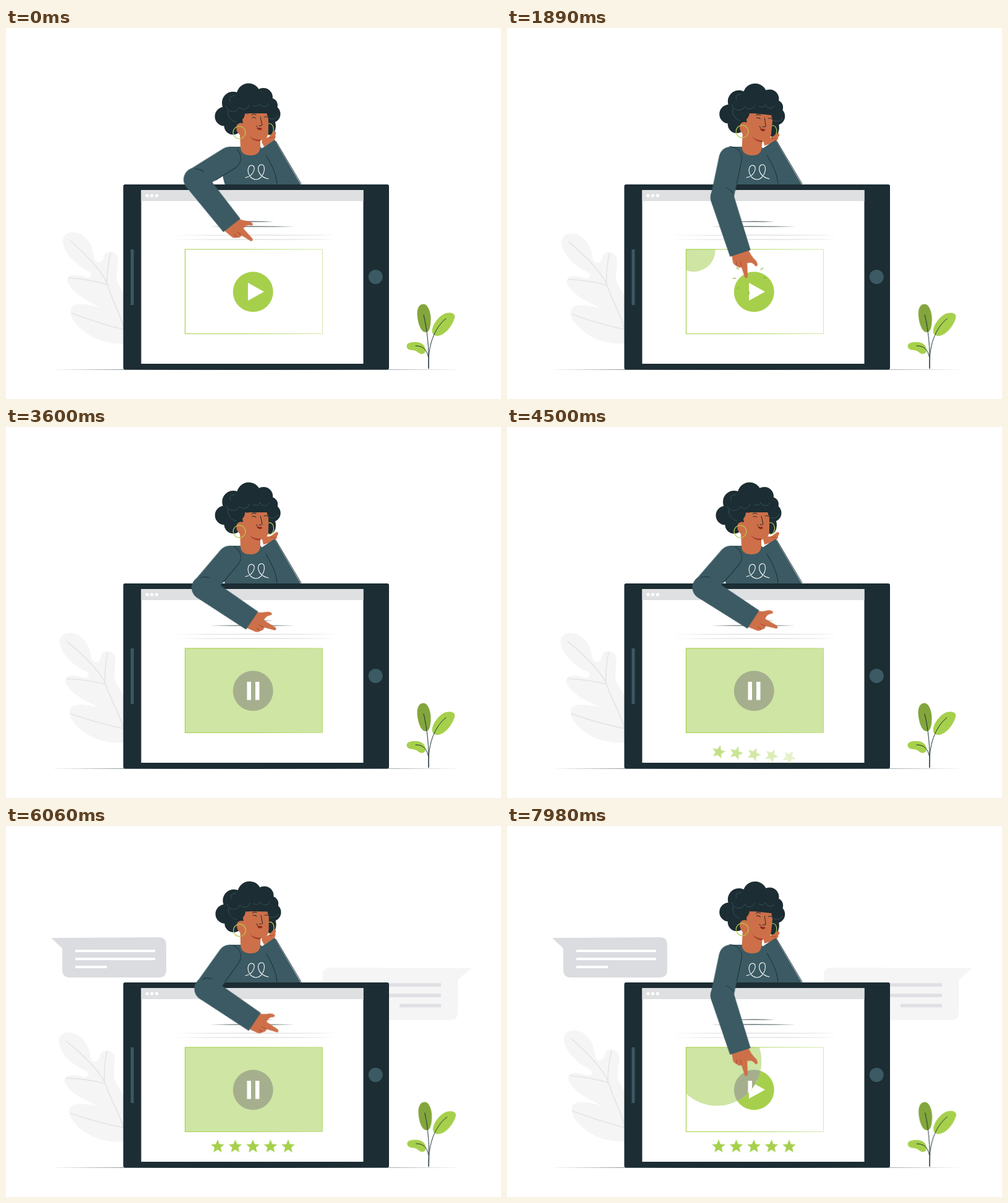
An HTML page without scripts for the animation above (8 s loop, 800 by 600 pixels).

```html
<!DOCTYPE html>
<html lang="en">
<head>
<meta charset="utf-8">
<title>Video lesson</title>
<style>
  html, body { margin: 0; width: 100%; height: 100%; overflow: hidden; background: #fff; }
  svg { display: block; width: 100vw; height: 100vh; }

  .upper, .fore, .hand, .head, .chin-hand, .big-leaf, .plant,
  .reveal, .burst, .star, .bubble { animation: 8s ease-in-out infinite both; }

  /* shoulder, elbow, wrist */
  .upper { animation-name: upper; }
  .fore { animation-name: fore; }
  .hand { animation-name: hand; }
  @keyframes upper {
    0% { rotate: 148deg; }
    13%, 33.75% { rotate: 101.8deg; animation-timing-function: ease-in; }
    37.5% { rotate: 112.6deg; animation-timing-function: ease-out; }
    46.25%, 71.25% { rotate: 130.9deg; animation-timing-function: ease-in; }
    75.75% { rotate: 125.5deg; animation-timing-function: ease-out; }
    85%, 100% { rotate: 101.8deg; }
  }
  @keyframes fore {
    0% { rotate: -96.5deg; }
    13%, 33.75% { rotate: -29.8deg; animation-timing-function: ease-in; }
    37.5% { rotate: -49.6deg; animation-timing-function: ease-out; }
    46.25%, 71.25% { rotate: -97.9deg; animation-timing-function: ease-in; }
    75.75% { rotate: -91.5deg; animation-timing-function: ease-out; }
    85%, 100% { rotate: -29.8deg; }
  }
  @keyframes hand {
    0% { rotate: -15.5deg; }
    13%, 33.75% { rotate: 3.6deg; }
    37.5% { rotate: 1deg; animation-timing-function: ease-out; }
    46.25%, 71.25% { rotate: -15deg; animation-timing-function: ease-in; }
    75.75% { rotate: -12.5deg; animation-timing-function: ease-out; }
    85%, 100% { rotate: 3.6deg; }
  }

  .head { transform-origin: 395px 200px; animation-name: head; }
  @keyframes head {
    0% { rotate: 0deg; }
    12%, 33.75% { rotate: 5.6deg; animation-timing-function: ease-in; }
    37.5% { rotate: 5.1deg; }
    46.25%, 71.25% { rotate: 0deg; animation-timing-function: ease-in; }
    75.75% { rotate: 1deg; animation-timing-function: ease-out; }
    85%, 100% { rotate: 5.6deg; }
  }
  .chin-hand { transform-origin: 424px 187px; animation-name: chin; }
  @keyframes chin {
    0%, 75.75% { rotate: 0deg; }
    12%, 37.5% { rotate: 14deg; }
    46.25%, 62% { rotate: 13deg; }
    85%, 100% { rotate: 15deg; }
  }

  .big-leaf { transform-origin: 192px 510px; animation-name: leaf; }
  @keyframes leaf {
    0%, 33%, 99.75%, 100% { rotate: 0deg; }
    17%, 50% { rotate: -2.4deg; }
    23.6% { rotate: -1.4deg; }
    37.5% { rotate: -.7deg; }
    56.25% { rotate: -1.9deg; }
    65% { rotate: -1.3deg; }
    75.75%, 87.75% { rotate: -2.4deg; }
  }
  .plant { transform-origin: 683px 552px; animation-name: sway; }
  @keyframes sway {
    0%, 11.25%, 22.5%, 33.75%, 45%, 56.25%, 67.5%, 78.75%, 90% { rotate: 0deg; }
    5.625%, 16.875%, 28.125%, 39.375%, 50.625%, 61.875%, 73.125%, 84.375%, 95.625% { rotate: 2.2deg; }
    100% { rotate: .4deg; }
  }

  .reveal { animation-name: reveal; }
  @keyframes reveal {
    0%, 20.6% { transform: translate(267px, 340px) scale(0); }
    29.4%, 95.4% { transform: translate(407px, 418px) scale(1); animation-timing-function: ease-in; }
    100% { transform: translate(333px, 377px) scale(.47); }
  }
  .burst { animation-name: burst; }
  @keyframes burst {
    0%, 20.6% { transform: scale(.3); opacity: 0; }
    21.3% { transform: scale(.6); opacity: 1; animation-timing-function: ease-out; }
    24% { transform: scale(1.04); opacity: 1; }
    26%, 100% { transform: scale(1.15); opacity: 0; }
  }

  /* later stars reuse the rise with a small delay */
  .star { animation-name: rise; animation-delay: calc(var(--i) * 40ms); }
  @keyframes rise {
    0%, 53.1% { transform: translateY(22px) rotate(45deg); opacity: 0; animation-timing-function: cubic-bezier(.3, .6, .6, 1); }
    60.6%, 100% { transform: none; opacity: 1; }
  }

  .bubble { animation-name: pop-left; transform-origin: 73px 181px; }
  .bubble.right { animation-name: pop-right; transform-origin: 752px 230px; }
  @keyframes pop-left {
    0%, 57.5% { scale: 0; animation-timing-function: ease-out; }
    64%, 100% { scale: 1; }
  }
  @keyframes pop-right {
    0%, 62.5% { scale: 0; animation-timing-function: ease-out; }
    69%, 100% { scale: 1; }
  }

  .dark { fill: #1c2d33; }
  .cloth { fill: #3b5a63; }
  .skin { fill: #cd7049; }
  .lime { fill: #a6d04c; }
  .ink { fill: none; stroke: #1c2d33; stroke-width: 1; stroke-linecap: round; }
  .curl { fill: none; stroke: #3b5a63; stroke-width: .8; }
  .sleeve { fill: none; stroke: #3b5a63; }
</style>
</head>
<body>
<svg viewBox="0 0 800 600" xmlns="http://www.w3.org/2000/svg">
  <defs>
    <clipPath id="wipe"><circle class="reveal" r="140"/></clipPath>
    <path id="star" d="M0-11.5 3-4.1 10.9-3.6 4.9 1.6 6.8 9.3 0 5.1-6.8 9.3-4.9 1.6-10.9-3.6-3-4.1Z" class="lime"/>
    <path id="tick" d="M22 0h4" stroke="#8bb03e" stroke-width="1.3" stroke-linecap="round"/>
    <linearGradient id="edge">
      <stop offset=".4" stop-color="#a6d04c"/>
      <stop offset="1" stop-color="#a6d04c" stop-opacity=".45"/>
    </linearGradient>
  </defs>

  <g class="big-leaf">
    <path fill="#f5f5f5" d="M194 510C165 512 140 503 124 489C110 477 102 465 105 454C110 443 128 446 152 452C135 442 108 432 99 410C97 399 110 396 128 403C136 405 140 400 135 394C112 384 92 362 92 344C93 333 102 328 114 331C130 335 140 350 142 370C143 381 156 383 158 369C160 359 176 360 180 369C184 380 177 395 179 406C181 420 196 432 196 450Z"/>
    <path fill="none" stroke="#e4e4e4" stroke-width="1.6" stroke-linecap="round" d="M104 344C136 372 160 400 165 418C173 445 187 465 192 494M102 404Q138 407 163 415M169 364Q163 388 163 415M106 461Q150 478 192 488"/>
  </g>

  <g class="bubble">
    <path fill="#dbdce0" d="M73 181 247 180Q259 180 259 192V233Q259 245 247 245H103Q91 245 91 233V198Z"/>
    <path stroke="#fff" stroke-width="4" d="M112 202H241M112 215H241M112 228H163"/>
  </g>
  <g class="bubble right">
    <path fill="#f5f5f6" d="M752 230 524 229Q512 229 512 241V302Q512 314 524 314H717Q730 314 730 302V249Z"/>
    <path stroke="#e0e0e4" stroke-width="5.5" d="M560 257H703M560 274H703M636 290.500H703"/>
  </g>

  <!-- body behind the tablet -->
  <path class="cloth" d="M361 192 382 192H411L414 195 434 181 478 256H355Q346 235 352 205Z"/>
  <path class="ink" d="M415 195C424 215 436 228 438 252M436 183 477 252"/>
  <path fill="none" stroke="#fff" stroke-width="1.100" stroke-linecap="round" d="M387 242C400 240 406 223 397 222C388 222 389 243 403 245C417 246 422 221 413 221C404 221 405 240 424 244"/>

  <g class="head">
    <g class="dark">
      <circle cx="392" cy="109" r="19.500"/>
      <circle cx="367" cy="121" r="18"/>
      <circle cx="416" cy="112" r="15"/>
      <circle cx="353" cy="143" r="15.500"/>
      <circle cx="427" cy="125" r="12"/>
      <circle cx="429" cy="139" r="14.500"/>
      <circle cx="367" cy="158" r="14.500"/>
      <ellipse cx="392" cy="135" rx="40" ry="26"/>
      <ellipse cx="427" cy="159" rx="9" ry="14"/>
    </g>
    <ellipse cx="426" cy="164" rx="6.500" ry="9.500" fill="none" stroke="#b8cb50" stroke-width="1.200"/>
    <path class="skin" d="M380 138H424V167Q424 181 411 182V193Q410 206 395 206Q380 206 379 193L378 173Q370 166 373 157Q377 152 383 154Z"/>
    <path fill="#a53c28" d="M394 175Q400 181 411 180.500V183Q400 184 394 175Z"/>
    <g class="dark">
      <circle cx="371" cy="138" r="15"/>
      <circle cx="389" cy="127" r="11.500"/>
      <circle cx="401" cy="130" r="8"/>
      <circle cx="411" cy="129" r="8"/>
      <circle cx="419" cy="128" r="9"/>
      <circle cx="431" cy="138" r="9.500"/>
    </g>
    <path class="curl" d="M356 127A11 11 0 0 0 377 128A9 9 0 0 0 393 124M399 125A7 7 0 0 0 410 122A8 8 0 0 0 425 122M358 133Q358 149 372 152M425 146A11 11 0 0 0 440 141M363 119Q358 111 370 109"/>
    <path class="ink" d="M397 140.500Q400 138 404 140M398 145Q401 143 404 146M417 144Q420 142 424 145M411 144 414 157Q411 159 409 158M404 158 406 160"/>
    <path fill="#8e2a20" d="M405 162Q408 160 410 162Q412 160 414 163Q410 168 405 162Z"/>
    <circle cx="377" cy="169" r="10" fill="none" stroke="#b8cb50" stroke-width="1.200"/>
  </g>

  <g class="chin-hand">
    <path class="skin" d="M417 192 413 184Q415 178 424 177C428 174 431 168 434 167Q438 168 435 174L436 175Q434 183 430 184Z"/>
    <path fill="none" stroke="#a53c28" stroke-width=".7" d="M424 177Q429 179 432 176"/>
  </g>
  <path class="cloth" d="M413 195 434 181 440 192 420 206Z"/>

  <!-- tablet -->
  <rect class="dark" x="189.500" y="253" width="429.500" height="299.500" rx="3"/>
  <rect x="218.500" y="262" width="359" height="281" fill="#fff"/>
  <rect x="218.500" y="262" width="359" height="18" fill="#dfe0e2"/>
  <g fill="#fff">
    <circle cx="228" cy="271" r="2.600"/>
    <circle cx="235.700" cy="271" r="2.600"/>
    <circle cx="243.500" cy="271" r="2.600"/>
  </g>
  <rect class="cloth" x="201.500" y="358" width="5" height="90"/>
  <circle class="cloth" cx="597.300" cy="402.500" r="11.500"/>

  <path class="dark" d="M366 313Q400 311.800 433 313Q400 314.200 366 313ZM329 321Q398 319.800 467 321Q398 322.200 329 321ZM70 552.300 400 551.700 738 552.300 400 553Z"/>
  <path fill="#d2d2d4" d="M264 335Q400 334 536 335Q400 336.200 264 335ZM266 342Q400 341 532 342Q400 343.200 266 342Z"/>

  <!-- player -->
  <circle class="lime" cx="399.300" cy="426.700" r="32.500"/>
  <path fill="#fff" d="M391 412 417 426.500 391 441Z"/>
  <g clip-path="url(#wipe)">
    <rect x="289" y="357.500" width="223" height="137" fill="#cee5a4"/>
    <circle cx="399.300" cy="426.700" r="32.500" fill="#a6af8d"/>
    <path fill="#fff" d="M389.500 412h6.500v29.500h-6.500ZM403 412h6.500v29.500h-6.500Z"/>
  </g>
  <path fill="none" stroke="url(#edge)" stroke-width="1.200" d="M511.500 358H289.500V494.500H511.500Z"/>
  <g transform="translate(392 404)">
    <g class="burst">
      <use href="#tick"/>
      <use href="#tick" transform="rotate(92)"/>
      <use href="#tick" transform="rotate(138)"/>
      <use href="#tick" transform="rotate(178)"/>
      <use href="#tick" transform="rotate(218)"/>
      <use href="#tick" transform="rotate(324)"/>
    </g>
  </g>

  <g transform="translate(342 518.500)"><use href="#star" class="star" style="--i:0"/></g>
  <g transform="translate(370.500 518.500)"><use href="#star" class="star" style="--i:1"/></g>
  <g transform="translate(399 518.500)"><use href="#star" class="star" style="--i:2"/></g>
  <g transform="translate(427.500 518.500)"><use href="#star" class="star" style="--i:3"/></g>
  <g transform="translate(456 518.500)"><use href="#star" class="star" style="--i:4"/></g>

  <!-- pointing arm: every joint sits at its own origin, limbs run along x -->
  <g transform="translate(361 210.500)">
    <g class="upper">
      <path class="sleeve" stroke-width="37" stroke-linecap="round" d="M0 0H65"/>
      <path class="ink" d="M-18 5A18.700 18.700 0 0 1 0-18.500H38"/>
      <g transform="translate(65 0)">
        <g class="fore">
          <g transform="translate(95 0)">
            <g class="hand">
              <path class="skin" d="M-6-14C4-15 10-17 15-20Q21-24 26-22Q28-19 24-17.500Q18-15 18-7L39-2.500Q43 0 40 2.500L22 4Q23 9 18 11Q15 16 9 15L-6 14Z"/>
              <path fill="none" stroke="#a53c28" stroke-width=".8" d="M22 4 13 3M18 11 11 9"/>
            </g>
          </g>
          <circle class="cloth" r="19"/>
          <path class="cloth" d="M0-19 95-17.500V17.500L0 19Z"/>
          <path class="ink" d="M-13-11Q-8-17-1-19"/>
        </g>
      </g>
    </g>
  </g>

  <g class="plant">
    <path fill="#83a63c" d="M674 446.500C682 446 687 460 686.500 473C686 485 684 492 678 492C670 492 665 476 664.500 462C664.500 453 668 447 674 446.500Z"/>
    <path class="lime" d="M712 461C720 459 727 462 725 469C721 482 710 497 697 498C689 498 687 491 690 483C694 473 703 463 712 461ZM648 517C646 511 651 508 660 508C671 507 678 513 678 521C678 528 670 529 665 524C660 519 651 523 648 517Z"/>
    <path class="ink" d="M683 551C684 518 681 489 675 464M683 550C681 515 692 485 711 470M682.500 532C680 520 674 514 662 514"/>
  </g>
</svg>
</body>
</html>
```
